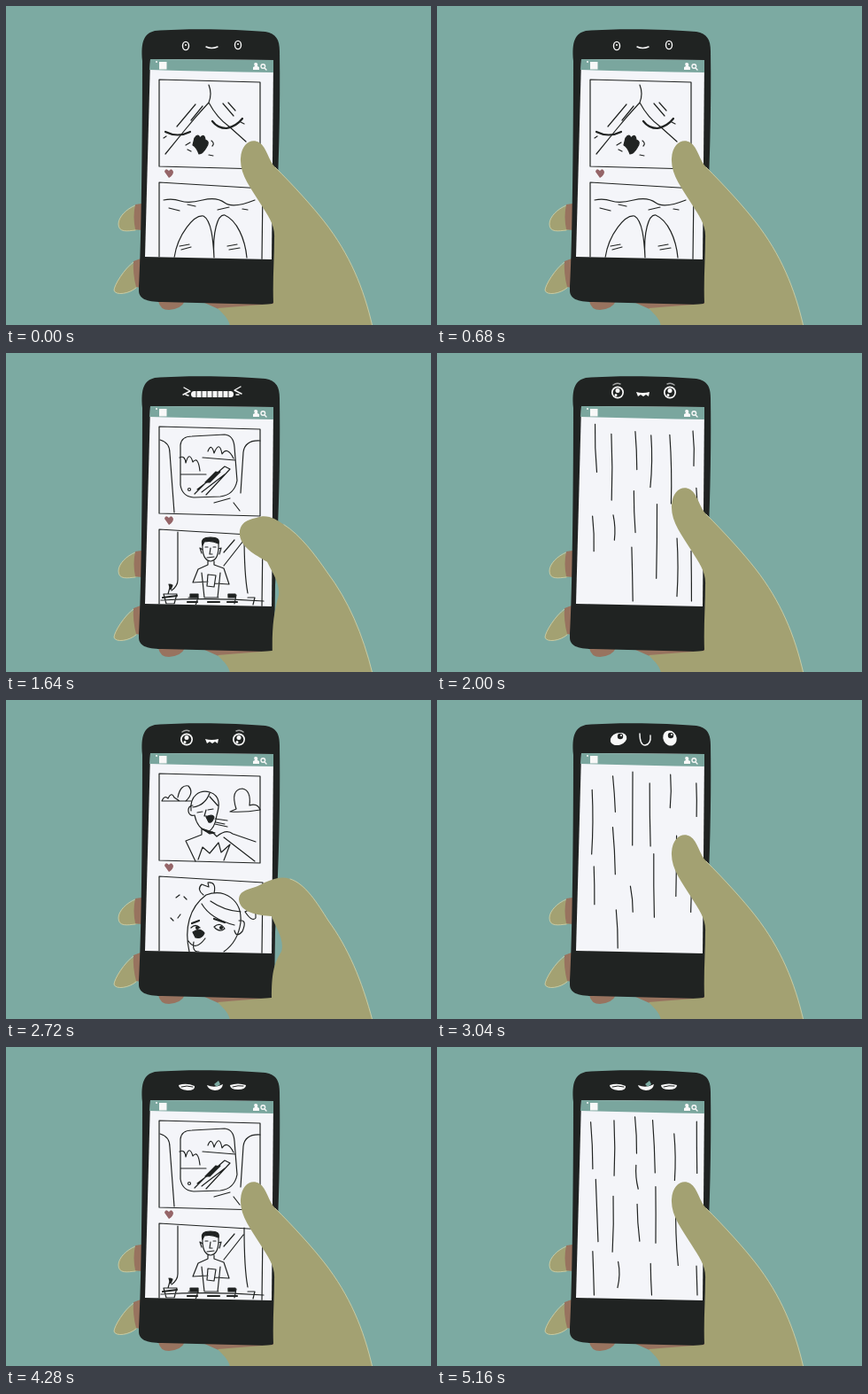
Recreate the animation shown at these times as an HTML page. Size 480 px wide and 360 px high, loop 5.2 s.

```html
<!DOCTYPE html>
<html lang="en">
<head>
<meta charset="utf-8">
<title>Scrolling thumb</title>
<style>
html, body { margin: 0; width: 100%; height: 100%; overflow: hidden; background: #7caaa2; }
svg { display: block; width: 100vw; height: 100vh; }
path, ellipse, circle { stroke-linecap: round; stroke-linejoin: round; }
.ink { fill: none; stroke: #202322; stroke-width: 1.2; }
.bold { stroke-width: 2.2; }
.solid { fill: #202322; }
.paper { fill: #f4f5f9; }
.skin { fill: #a3a172; }
.rim { fill: none; stroke: #cfd0a6; stroke-width: .9; }
.shade { fill: #98735f; }
.chalk { fill: none; stroke: #f8f8f8; stroke-width: 1.4; }
.white { fill: #f8f8f8; stroke: none; }
.dark { fill: #202322; stroke: none; }
</style>
</head>
<body>
<svg viewBox="0 0 480 360">
  <clipPath id="screen"><path d="M163 60L302 61L300 286L157 283Z"/></clipPath>
  <rect width="480" height="360" fill="#7caaa2"/>

  <!-- fingers behind the phone -->
  <path class="skin" d="M152 224C140 226 127 237 127 246C127 257 140 254 152 252Z"/>
  <path class="rim" d="M146 225C136 229 127 238 127 246C127 256 137 254 146 253"/>
  <path class="skin" d="M152 287C137 290 122 314 122 321C125 328 144 324 152 313Z"/>
  <path class="rim" d="M144 289C134 296 122 315 122 321C124 327 139 325 147 318"/>
  <path class="shade" d="M146 224L153 223V253L146 252Q143 238 146 224ZM144 288L152 285V318L147 317Q143 302 144 288ZM172 333H202Q198 342 184 343Q174 343 172 333ZM222 334H304V342H240Z"/>

  <path class="dark" d="M154 62C152 40 156 31 168 28C205 25 260 26 293 29C305 31 309 38 309 51C310 115 308 190 304 262L303 331Q303 337 296 337L176 334C158 334 150 330 150 321C153 270 154 150 154 62Z"/>
  <path class="paper" d="M163 60L302 61L300 286L157 283Z"/>
  <path fill="#7aa69e" d="M163 60L302 61V75Q230 74 162 72Z"/>
  <rect x="173" y="63" width="8.5" height="8.5" class="white"/>
  <circle cx="170" cy="63" r="1" class="white"/>
  <path class="white" d="M279 72V69L281 68Q279 64 282 64Q285 64 284 68L286 69V72Z"/>
  <path class="chalk" d="M288 68a2.3 2.3 0 1 0 4.6 0a2.3 2.3 0 1 0 -4.6 0M292 70L294 72"/>

  <g clip-path="url(#screen)">
    <path id="streaks" class="ink"/>
    <g id="page" class="ink">
      <path d="M173 83L287 86V184L173 181ZM173 284V199L290 206L289 286"/>
      <path d="M184 194L179 187Q180 182 184 186Q187 182 189 187Q189 191 184 194Z" fill="#956568" stroke="none"/>

      <g class="feed">
        <path d="M229 89Q233 99 229 109Q214 125 202 140L180 167M229 109Q238 126 252 136L271 153M214 111L193 136M222 113L209 129M245 110L257 124M251 109L259 118M203 157L208 154M205 162L209 164M232 152Q236 155 233 158M229 168L234 169M181 147L178 149M265 131L269 133"/>
        <path class="bold" d="M180 142Q194 149 208 142M233 130Q239 138 249 138Q260 136 267 127"/>
        <path class="solid" d="M213 149Q217 143 219 149Q224 143 225 151Q231 153 226 160Q222 167 218 167Q215 159 211 157Z"/>
        <path d="M178 219Q188 217 197 220T222 219T247 222T281 219M184 228L196 231M205 224L214 226M239 230L252 227M267 229L273 230M190 284C194 257 213 235 223 237C232 242 234 264 235 284C233 255 239 235 247 236C261 242 270 263 272 284M196 271L207 269M198 275L209 272M250 271L261 269M252 275L264 273"/>
      </g>

      <g class="feed">
        <path d="M209 125C207 107 220 101 230 104C243 108 241 120 238 130Q236 145 228 149Q216 145 213 130M211 119C203 119 205 133 213 130M211 121Q225 119 230 105M230 109L239 119M216 127L222 126M228 124L234 123M226 124L224 131L227 131M236 134L250 136M237 138L247 140M236 140L250 143M221 145V152L203 159L214 182M233 149L238 154Q249 145 256 151L282 160M246 155L281 182M217 180L222 166L230 173L240 161L243 172L253 163L246 181"/>
        <path class="solid" d="M226 132Q233 128 235 132Q233 139 229 138ZM221 145L236 150L230 151Z"/>
        <path d="M176 114Q179 107 183 111Q187 103 190 110L196 114M194 110Q197 95 206 97Q213 105 203 114M176 114H209M253 126L260 123Q253 101 267 100Q277 102 275 119Q284 116 287 124Q270 127 253 126"/>
        <path d="M207 284C201 258 207 234 226 220C247 212 267 226 265 251Q262 273 246 284M221 230Q231 247 258 254M231 227Q247 238 265 239M223 220Q215 214 221 208L229 211L228 206Q238 205 235 218M263 249Q273 247 267 261Q260 269 258 260M209 257Q214 252 219 257M235 256Q242 250 247 258Q241 263 235 256M270 239Q283 231 282 246Q278 251 270 239M192 223L196 220M186 246L189 249M201 222L204 225M194 246L197 242M206 272Q214 284 225 269M212 273Q210 285 218 284"/>
        <path class="bold" d="M210 252L218 249M235 247L247 251"/>
        <path class="solid" d="M211 262Q219 256 224 263Q221 270 214 268Z"/>
        <circle cx="243" cy="257" r="1.5" class="solid"/><circle cx="216" cy="257" r="1.5" class="solid"/>
      </g>

      <g class="feed">
        <ellipse cx="231" cy="91" rx="8" ry="5" class="solid"/>
        <path class="solid" d="M227 95H236L246 100L251 117L246 120L247 150L242 183H212L209 150L213 118L210 115L217 100Z"/>
        <path class="paper" d="M207 183C204 165 208 137 218 138C229 140 226 166 225 183ZM227 183C226 165 227 139 237 139C247 142 245 168 244 183Z"/>
        <path d="M210 151Q217 145 225 151M229 152Q236 146 244 152M211 157L222 156M211 162L222 161M211 167L222 166M211 172L222 171M231 157L241 158M231 162L241 163M231 167L241 168M231 172L241 173"/>
        <path d="M196 201L190 216M204 201Q195 211 197 226M252 204L260 226M246 204Q254 212 251 230M190 216Q183 219 188 231L195 236M258 214Q263 219 258 234M195 235L205 284M253 237L243 284M201 221L243 216L245 232L200 234ZM188 234L190 284M262 237V284M209 275L213 277"/>
        <path class="solid" d="M191 210Q202 207 204 216L202 235Q193 240 191 230ZM246 214Q256 209 258 219Q256 236 247 238ZM202 211L214 206L220 215L203 219ZM225 208L242 206L241 215L228 217ZM201 228L243 222L245 231L202 234Z"/>
        <circle cx="226" cy="252" r="15" class="dark"/>
      </g>

      <g class="feed">
        <path d="M197 104Q198 94 210 94L247 92Q257 93 258 106L261 144Q258 160 242 162L212 163Q199 162 197 149ZM174 98Q185 101 185 113L190 180M287 99Q270 98 268 112L265 158M196 118Q202 115 203 124Q207 110 211 123Q217 116 219 133M197 137H226M228 111Q232 101 235 113Q241 98 244 114Q250 105 257 119M222 118L259 121M213 159L225 147L247 128L253 131L226 160M216 154L242 134M221 157L247 137M257 169L264 178M235 169L253 164"/>
        <path class="solid" d="M225 146L237 134L241 135L230 146Z"/><circle cx="207" cy="154" r="1.5"/>
        <path d="M194 202V256Q194 263 187 268M269 204Q269 250 273 271M268 212L246 240M258 211L246 225M222 214Q221 234 231 235Q241 234 240 214M222 222L219 220L221 226M240 221L243 220L241 227M231 220L230 227L233 227M227 231L235 230M225 219H228M234 219H237M228 235V239L217 244L211 259L228 258M235 235V239L246 243L252 261L236 260M221 248L224 276M242 248L239 276M228 250L237 251L235 264L227 263ZM225 276H240M175 279Q230 276 291 280M178 272H193L190 283H181ZM206 276H217L214 285M230 278H242M251 273H260L258 283M273 276H281L279 284M183 272L186 261"/>
        <path class="solid" d="M222 217Q219 208 231 208Q242 208 240 215Q232 211 224 213ZM184 261L188 262L186 267ZM208 272H217V276H208ZM251 272H259V276H251Z"/>
        <path class="bold" d="M177 276L193 274M205 281H216M228 281H241M250 281H261"/>
      </g>
    </g>
  </g>

  <!-- expressions on the phone -->
  <g class="face">
    <g id="open"><ellipse cx="203" cy="45" rx="3.5" ry="4.6" class="chalk"/><ellipse cx="262" cy="44" rx="3.5" ry="4.6" class="chalk"/><circle cx="203" cy="44" r="1" class="white"/><circle cx="262" cy="43" r="1" class="white"/></g>
    <path id="shut" class="chalk" d="M199 46Q203 48 207 46M258 45Q262 47 266 45"/>
    <path class="chalk" d="M226 46Q232 49 239 46"/>
  </g>
  <g class="face">
    <rect x="209" y="43" width="48" height="7" rx="3.5" class="white"/>
    <path d="M215 43V50M221 43V50M227 43V50M233 43V50M239 43V50M245 43V50M251 43V50" stroke="#202322"/>
    <path class="chalk" d="M201 39L208 43L200 47M203 47L206 48M265 38L258 42L266 46M260 47L263 47"/>
  </g>
  <g class="face">
    <circle cx="204" cy="44.5" r="7" class="white"/><circle cx="263" cy="44.5" r="7" class="white"/>
    <circle cx="204" cy="44.5" r="5.3" class="dark"/><circle cx="263" cy="44.5" r="5.3" class="dark"/>
    <path class="white" d="M204 40a2.5 2.5 0 1 1 0 5a2.5 2.5 0 1 1 0-5M202 46a1.5 1.5 0 1 1 0 3a1.5 1.5 0 1 1 0-3M263 40a2.5 2.5 0 1 1 0 5a2.5 2.5 0 1 1 0-5M261 46a1.5 1.5 0 1 1 0 3a1.5 1.5 0 1 1 0-3"/>
    <path class="chalk" d="M199 36Q203 33 207 35M260 35Q264 33 268 36" stroke-opacity=".6"/>
    <path class="white" d="M225 44Q232 46 240 44L239 49L236 47L233 49L230 47L227 49Z"/>
  </g>
  <g class="face">
    <ellipse cx="205" cy="44" rx="9.5" ry="6.8" transform="rotate(-18 205 44)" class="white"/>
    <ellipse cx="263" cy="43" rx="7.5" ry="8.8" transform="rotate(-25 263 43)" class="white"/>
    <g id="pupils"><circle cx="207" cy="41" r="3.2" class="dark"/><circle cx="264" cy="40" r="3.2" class="dark"/><circle cx="208" cy="40" r="1" class="white"/><circle cx="265" cy="39" r="1" class="white"/></g>
    <path class="chalk" d="M229 38Q229 51 235 51Q242 50 241 40" stroke-width="2"/>
  </g>
  <g class="face">
    <path class="white" d="M195 43Q204 40 213 44Q214 49 205 49Q195 48 195 43ZM253 43Q262 40 271 43Q271 48 262 48Q253 48 253 43ZM227 43Q236 47 245 42Q244 49 236 49Q228 48 227 43Z"/>
    <path d="M198 45Q204 43 211 45M256 45Q262 43 268 44" fill="none" stroke="#202322"/>
    <path fill="#7caaa2" d="M235 42L240 38L242 42L238 45Z"/>
  </g>

  <path id="hand" class="skin"/>
  <path id="edge" class="rim"/>
</svg>
<script>
const $ = id => document.getElementById(id);
const nums = s => s.split(' ').map(Number);
const faces = document.querySelectorAll('.face'), feeds = document.querySelectorAll('.feed');

// Outline of the hand as cubic curves: thumb stretched and thumb bent
const stretched = nums('302 336 301 310 303 285 303 262 304 247 296 237 288 224 276 205 264 190 265 172 266 155 277 149 286 154 295 160 296 174 304 182 325 203 346 226 360 244 388 280 404 318 414 362');
const bent = nums('300 336 300 310 302 298 311 284 315 270 304 256 300 244 285 243 264 240 263 225 264 212 278 215 292 206 304 201 312 199 321 202 338 207 352 230 364 249 386 279 402 316 414 362');

// [time, value]: thumb bend eases between keys, face and page hold until the next one
const bendKeys = [[0, 0], [1000, 0], [1160, 1], [1240, 0], [1440, 0], [1800, 1], [1880, 0], [2160, 0],
  [2680, 1], [2760, 1], [2880, 0], [3280, 0], [3800, 1], [3840, 1], [3960, 0], [4360, 0], [4920, 1], [5000, 0], [5200, 0]];
const faceKeys = [[0, 0], [1200, 1], [1680, 2], [2960, 3], [4000, 4]];
const STREAKS = -1;
const pageKeys = [[0, 0], [1200, STREAKS], [1440, 3], [1840, STREAKS], [2160, 1], [2800, STREAKS],
  [3200, 2], [3880, STREAKS], [4240, 3], [4960, STREAKS]];

const held = (keys, t) => keys.filter(k => k[0] <= t).pop()[1];
const show = (el, on) => el.style.display = on ? '' : 'none';

function eased(keys, t) {
  const i = keys.findIndex(k => k[0] > t);
  const [t0, a] = keys[i - 1], [t1, b] = keys[i];
  const u = (t - t0) / (t1 - t0);
  return a + (b - a) * u * u * (3 - 2 * u);
}

function streaks(step) {
  let seed = step * 7919 + 13, d = '';
  const rnd = () => (seed = (seed * 16807) % 2147483647) / 2147483647;
  rnd();
  for (let col = 0; col < 6; col++) {
    let y = 78 + rnd() * 25;
    while (y < 255) {
      const x = 171 + col * 22.5 + rnd() * 9 + y / 100;
      const len = Math.min(25 + rnd() * 60, 280 - y);
      d += `M${x} ${y}q${rnd() * 4 - 1} ${len / 2} ${rnd() * 4 - 1} ${len}`;
      y += len + 8 + rnd() * 45;
    }
  }
  return d;
}

function drawHand(k) {
  const p = stretched.map((v, i) => v + (bent[i] - v) * k);
  $('hand').setAttribute('d', `M${p.slice(0, 2)}C${p.slice(2)}L253 362C252 352 244 347 239 341Z`);
  $('edge').setAttribute('d', `M${p.slice(30, 32)}C${p.slice(32)}`);
}

function draw(now) {
  const step = Math.floor(now % 5200 / 40), t = step * 40;
  const face = held(faceKeys, t), page = held(pageKeys, t);
  const blink = t >= 240 && t < 320 || t >= 600 && t < 680;
  faces.forEach((el, i) => show(el, i === face));
  feeds.forEach((el, i) => show(el, i === page));
  show($('page'), page !== STREAKS);
  show($('open'), !blink);
  show($('shut'), blink);
  $('pupils').setAttribute('transform', `translate(0 ${t >= 3320 && t < 3760 ? 5 : 0})`);
  $('streaks').setAttribute('d', page === STREAKS ? streaks(step) : '');
  drawHand(eased(bendKeys, t));
}

const start = performance.now();
function tick() {
  draw(performance.now() - start);
  requestAnimationFrame(tick);
}
tick();
</script>
</body>
</html>
```
